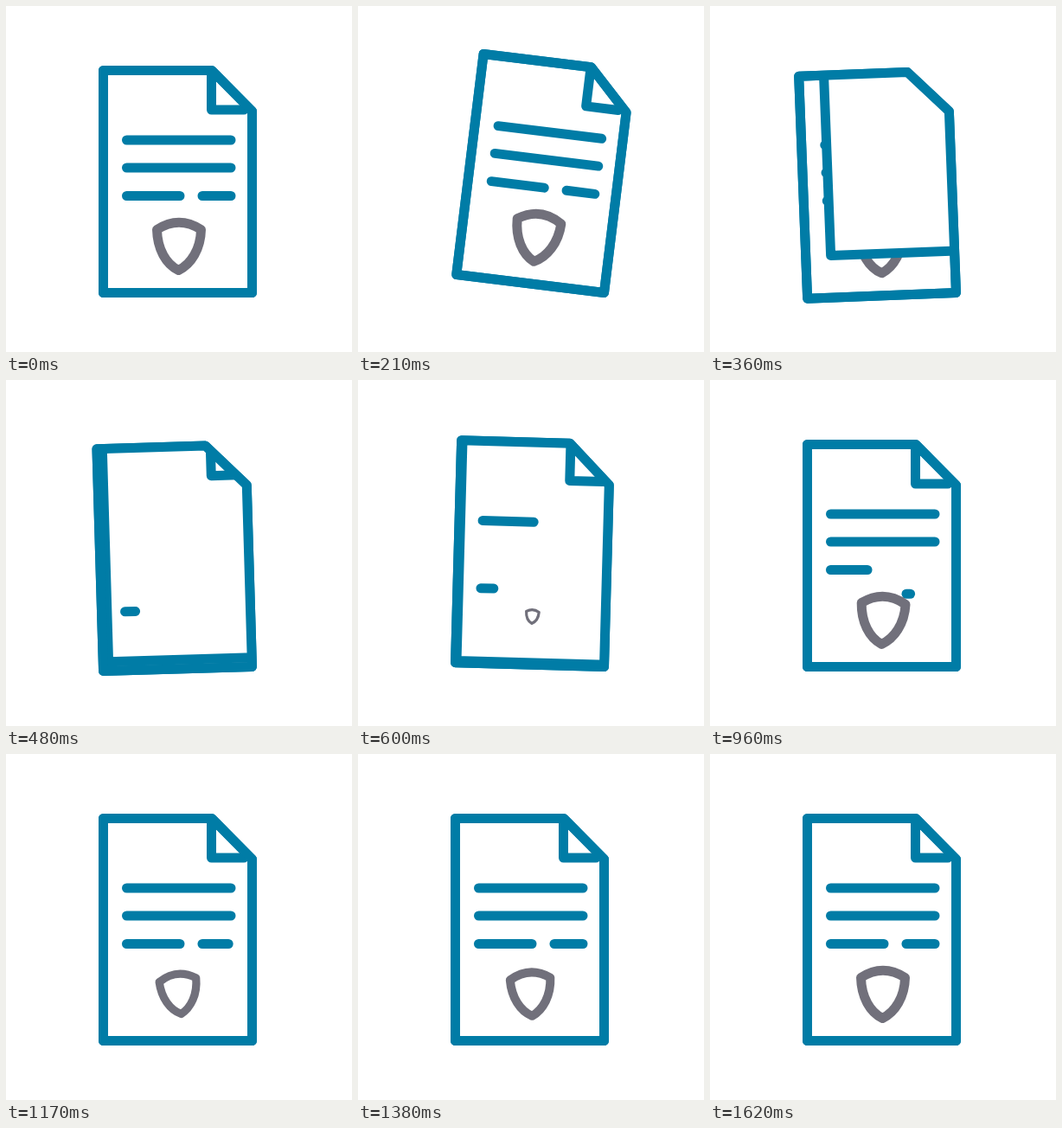
An HTML page for the animation above (3.71 s loop, 400 px wide and 400 px high).

```html
<!DOCTYPE html>
<html lang="en">
<head>
<meta charset="utf-8">
<title>Document</title>
<style>
  html, body { margin: 0; width: 100%; height: 100%; overflow: hidden; background: #fff; }
  svg { display: block; width: 100vw; height: 100vh; }
  .blue { stroke: #007ca6; }
  .gray { stroke: #71707b; }
</style>
</head>
<body>
<svg viewBox="0 0 400 400" fill="none" stroke-width="11" stroke-linecap="round" stroke-linejoin="round">
  <defs>
    <path id="sheet" d="M112.5 74.5H238L284.5 121.5V331.5H112.5Z"/>
    <path id="fold" d="M237.5 76V120H275"/>
    <path id="shield" d="M174.5 258.5Q200 242 225.5 258.5C225 281 214 298.5 199.5 305.5C185 298.5 175 281 174.5 258.5Z"/>
    <clipPath id="inside"><use href="#sheet"/></clipPath>
  </defs>
  <g id="page">
    <g class="blue">
      <use href="#sheet" fill="#fff"/>
      <use href="#fold"/>
      <path d="M139.5 155H260M139.5 187H260M139.5 219.5H201M227 219.5H260"/>
    </g>
    <use href="#shield" class="gray"/>
    <g clip-path="url(#inside)">
      <g id="next" class="blue">
        <use href="#sheet" fill="#fff"/>
        <use href="#fold"/>
      </g>
    </g>
    <use href="#sheet" class="blue"/>
    <g id="lines" class="blue"></g>
    <g id="badge"><use href="#shield" class="gray"/></g>
  </g>
</svg>
<script>
const LOOP = 3710, STEP = 30;
const $ = id => document.getElementById(id);
const clamp = u => Math.min(1, Math.max(0, u));
const ease = u => (1 - Math.cos(Math.PI * clamp(u))) / 2;

// [time, value] keys joined by smooth easing
function track(keys, t) {
  for (let i = 1; i < keys.length; i++) {
    const [t0, a] = keys[i - 1], [t1, b] = keys[i];
    if (t < t1) return a + (b - a) * ease((t - t0) / (t1 - t0));
  }
  return keys[keys.length - 1][1];
}

const tilt = [[0, 0], [210, 7], [393, -3], [648, 2], [850, 0]];
const size = [[520, 0], [760, 1.15], [1165, 0.84], [1620, 1]];
const spin = [[520, 0], [760, 10.5], [1165, -6.5], [1620, 0]];

// Each line rises from low on the page while it grows to the right
const START_Y = 275;
const lines = [
  { x: 139.5, end: 260, y: 155, from: 395, span: 415, rise: [440, 640] },
  { x: 139.5, end: 260, y: 187, from: 520, span: 350, rise: [520, 720] },
  { x: 139.5, end: 201, y: 219.5, from: 760, span: 320, rise: [760, 940] },
  { x: 227, end: 260, y: 219.5, from: 870, span: 370, rise: [870, 1050] }
];
for (const line of lines) {
  line.el = document.createElementNS('http://www.w3.org/2000/svg', 'path');
  $('lines').append(line.el);
}

function slide(t) {
  if (t < 215) return null;
  const k = t < 900 ? Math.exp((360 - t) / 79) : 0;
  return `translate(${28.9 * k} ${-48.5 * k})`;
}

function draw(t) {
  $('page').setAttribute('transform', `rotate(${track(tilt, t)} 284.5 331.5)`);

  const shift = slide(t);
  $('next').setAttribute('visibility', shift ? 'visible' : 'hidden');
  if (shift) $('next').setAttribute('transform', shift);

  for (const { el, x, end, y, from, span, rise } of lines) {
    const width = (end - x) * ease((t - from) / span);
    const height = track([[rise[0], START_Y], [rise[1], y]], t);
    el.setAttribute('d', t > rise[0] ? `M${x} ${height}h${width}` : '');
  }

  const scale = t > 520 ? track(size, t) : 0;
  $('badge').setAttribute('visibility', scale ? 'visible' : 'hidden');
  $('badge').setAttribute('transform',
    `translate(200 275) rotate(${track(spin, t)}) scale(${scale || 1}) translate(-200 -275)`);
}

const began = performance.now();
function tick() {
  const t = (performance.now() - began) % LOOP;
  draw(Math.floor(t / STEP) * STEP);
  requestAnimationFrame(tick);
}
tick();
</script>
</body>
</html>
```
